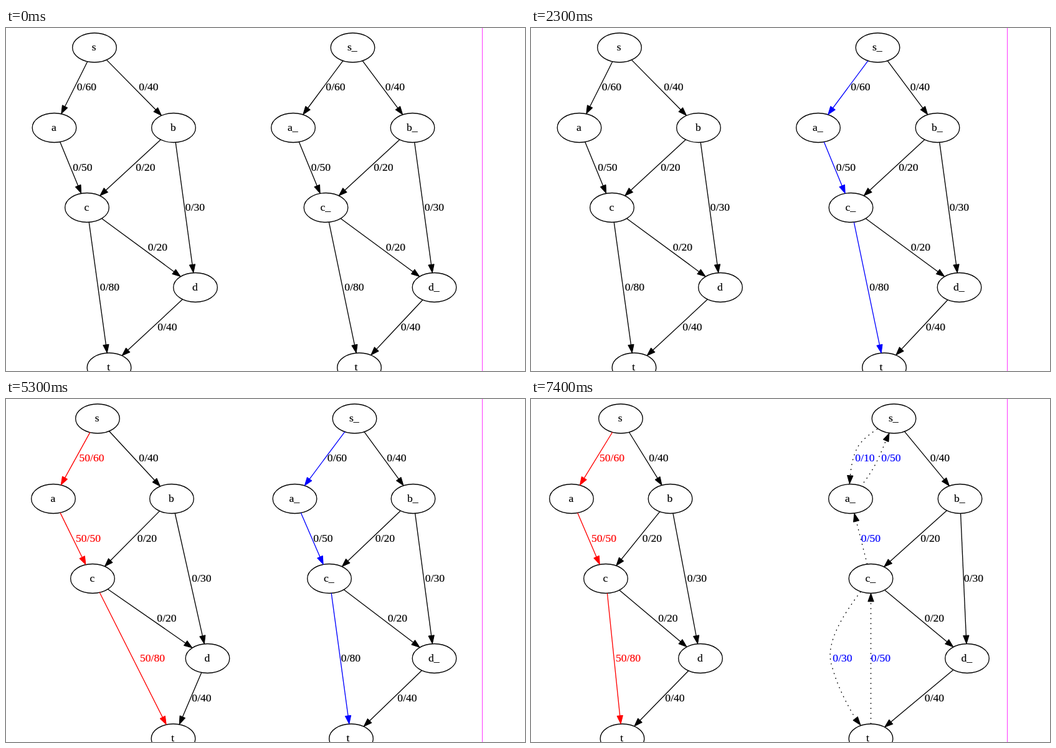
An HTML page that plays this animation: 833 by 550 pixels, repeating every 8000 ms.

```html
<!DOCTYPE html>
<html lang="en">
<head>
<meta charset="utf-8">
<title>Maximum flow</title>
<style>
html, body { margin: 0; width: 100%; height: 100%; overflow: hidden; background: #fff; }
svg { display: block; }
text { font: 17.6px "Liberation Serif", "Times New Roman", serif; text-anchor: middle;
  fill: currentColor; stroke: currentColor; stroke-width: .2; }
ellipse, .line { fill: none; stroke: currentColor; stroke-width: 1.33; }
.head { fill: currentColor; stroke: currentColor; stroke-width: 1; }
.dotted { stroke-dasharray: 1.8 6.2; }
.red { color: #f00; }
.blue { color: #00f; }
.scene { visibility: hidden; animation: 8s step-end infinite; }
#start { animation-name: start; }
#flow { animation-name: flow; }
#residual { animation-name: residual; }
#start .blue { animation: mark 8s step-end infinite; }
@keyframes start { 0% { visibility: visible; } 43.75%, 100% { visibility: hidden; } }
@keyframes flow { 0% { visibility: hidden; } 43.75% { visibility: visible; } 81.25%, 100% { visibility: hidden; } }
@keyframes residual { 0% { visibility: hidden; } 81.25%, 100% { visibility: visible; } }
@keyframes mark { 0% { color: #000; } 6.25%, 100% { color: #00f; } }
</style>
</head>
<body>
<svg width="833" height="550" viewBox="0 0 833 550" color="#000">
  <g id="start" class="scene"></g>
  <g id="flow" class="scene"></g>
  <g id="residual" class="scene"></g>
  <path d="M764.5 0V550" stroke="#ff33ff"/>
</svg>
<script>
const RX = 35.3, RY = 23.5, HEAD = 13.3, HALF = 4.7;
const nodeY = { s: 31.5, a: 160, b: 160, c: 288, d: 416, t: 544.5 };
const edges = ['sa', 'sb', 'ac', 'bc', 'bd', 'cd', 'ct', 'dt'];
const capacity = { sa: 60, sb: 40, ac: 50, bc: 20, bd: 30, cd: 20, ct: 80, dt: 40 };
const labelY = { sa: 94, sb: 94, ac: 223, bc: 223, bd: 287, cd: 351, ct: 415, dt: 479 };
const augmenting = ['sa', 'ac', 'ct'];

function add(parent, tag, attrs, text) {
  const el = document.createElementNS('http://www.w3.org/2000/svg', tag);
  for (const k in attrs) el.setAttribute(k, attrs[k]);
  if (text) el.textContent = text;
  return parent.appendChild(el);
}

function label(g, x, y, text, cls = '') {
  add(g, 'text', { x, y: y + 6, class: cls }, text);
}

// Draws a path from its d string, then a head from base point to tip.
function arrow(g, d, base, tip, cls, dotted) {
  const group = add(g, 'g', { class: cls });
  add(group, 'path', { d, class: dotted ? 'line dotted' : 'line' });
  const dx = tip[0] - base[0], dy = tip[1] - base[1], len = Math.hypot(dx, dy);
  const nx = -dy / len * HALF, ny = dx / len * HALF;
  add(group, 'path', { class: 'head',
    d: `M${tip}L${base[0] + nx} ${base[1] + ny}L${base[0] - nx} ${base[1] - ny}Z` });
}

// Straight edge between two node centres, clipped at the ellipses.
function straight(g, p, q, cls = '', dotted = false) {
  const dx = q[0] - p[0], dy = q[1] - p[1], len = Math.hypot(dx, dy);
  const k = 1 / Math.hypot(dx / RX, dy / RY), h = k + HEAD / len;
  const base = [q[0] - dx * h, q[1] - dy * h];
  arrow(g, `M${p[0] + dx * k} ${p[1] + dy * k}L${base}`,
    base, [q[0] - dx * k, q[1] - dy * k], cls, dotted);
}

function graph(id, xs, labelXs, { suffix = '', cls = '', flow = 0, residual = false }) {
  const g = document.getElementById(id), at = {};
  Object.keys(nodeY).forEach((n, i) => {
    at[n] = [xs[i], nodeY[n]];
    add(g, 'ellipse', { cx: xs[i], cy: nodeY[n], rx: RX, ry: RY });
    label(g, xs[i] - .7, nodeY[n] - 1.2, n + suffix);
  });
  edges.forEach((e, i) => {
    const marked = augmenting.includes(e);
    if (residual && marked) return;
    straight(g, at[e[0]], at[e[1]], marked ? cls : '');
    label(g, labelXs[i], labelY[e], `${marked ? flow : 0}/${capacity[e]}`,
      marked && flow ? cls : '');
  });
  if (!residual) return;
  straight(g, at.c, at.a, '', true);
  straight(g, at.t, at.c, '', true);
  arrow(g, 'M556 48C544 56 532 65 525 76C518 88 514 105 512.5 122', [512.3, 122.8], [511.3, 136], '', true);
  arrow(g, 'M534 134C540 126 546 117 551 108C558 95 564 81 569 68', [569.6, 66.8], [575, 54.6], '', true);
  arrow(g, 'M529 309C514 329 494 357 485 384C479 404 478 415 485 435C493 463 508 491 520 511', [520.6, 512.3], [529, 523], '', true);
  label(g, 536, 94, '0/10', 'blue');
  label(g, 578, 94, '0/50', 'blue');
  label(g, 545.5, 223, '0/50', 'blue');
  label(g, 500, 415, '0/30', 'blue');
  label(g, 561.5, 415, '0/50', 'blue');
}

const plan = { suffix: '_', cls: 'blue' }, sent = { cls: 'red', flow: 50 };

graph('start', [142, 77.5, 269, 130, 304, 165.5],
  [129.5, 229, 123, 224, 303.5, 243.5, 166.5, 259], {});
graph('start', [556.5, 461, 652.5, 513.5, 687.5, 567],
  [529, 624.5, 505.5, 606, 687.5, 625.5, 559, 649.5], plan);

graph('flow', [147, 76, 266, 139, 323.5, 268.5],
  [137.5, 229, 132, 226.5, 314, 258, 235, 314], sent);
graph('flow', [559.5, 463.5, 653.5, 519, 687.5, 554],
  [531.5, 627, 509, 608.5, 688.5, 628.5, 553.5, 644], plan);

graph('residual', [144, 65, 223.5, 120, 272, 146.5],
  [130, 205, 117, 194.5, 266.5, 220, 156, 231], sent);
graph('residual', [582.5, 513, 688.5, 545.5, 700, 545.5],
  [0, 656.5, 0, 641, 710.5, 647.5, 0, 647.5], { suffix: '_', residual: true });
</script>
</body>
</html>
```
